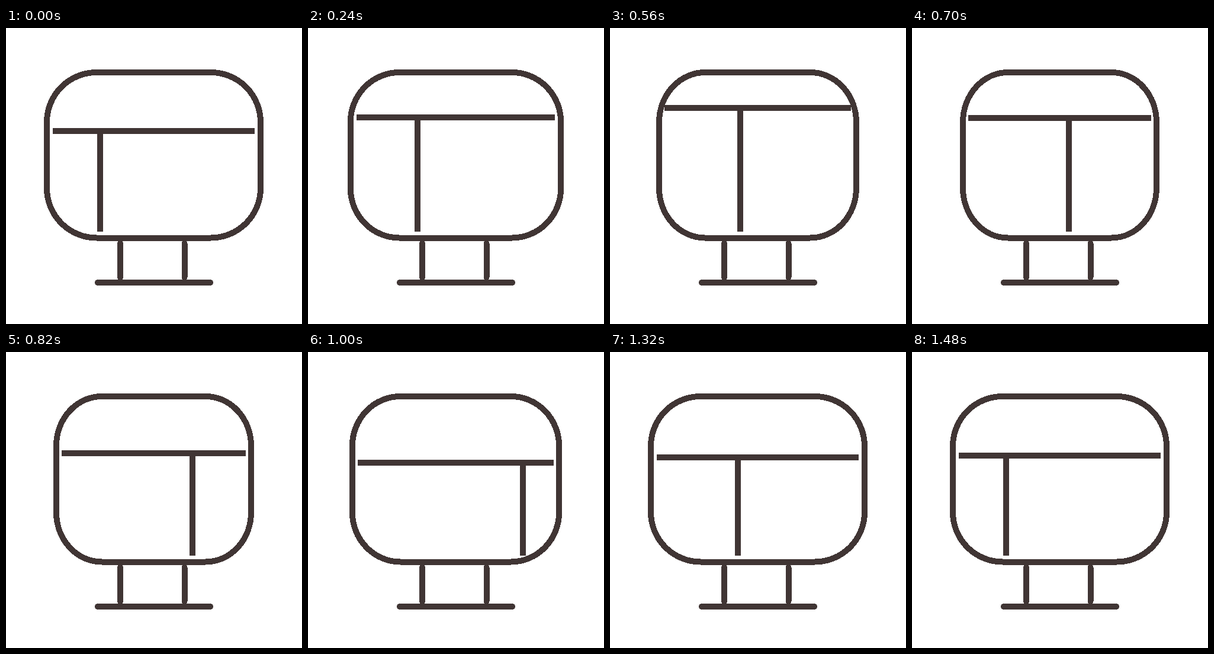
Recreate the animation shown at these times as an HTML page. Size 500 by 500 pixels, loop 1.5 s.

```html
<!DOCTYPE html>
<html lang="en">
<head>
<meta charset="utf-8">
<title>Screen on a stand</title>
<style>
  html, body { margin: 0; width: 100%; height: 100%; overflow: hidden; background: #fff; }
  svg { display: block; width: 100vw; height: 100vh; }
  g { fill: none; stroke: #403534; stroke-width: 10; shape-rendering: crispEdges; }
  .round { stroke-linecap: round; }
</style>
</head>
<body>
<svg viewBox="0 0 500 500">
  <g>
    <path class="round" d="M193 364V421M301.5 364V421M155 430H345"/>
    <rect id="screen" y="75" height="279.5"/>
    <path id="bars"/>
  </g>
</svg>
<script>
const LOOP = 1500, CX = 249.5;
const screenBox = document.getElementById('screen');
const bars = document.getElementById('bars');

const smooth = u => u * u * (3 - 2 * u);

// cubic-bezier(.3, 0, .55, 1), solved by bisection
function quick(u) {
  let lo = 0, hi = 1;
  for (let i = 0; i < 20; i++) {
    const m = (lo + hi) / 2, n = 1 - m;
    if (0.9 * n * n * m + 1.65 * n * m * m + m * m * m < u) lo = m; else hi = m;
  }
  return smooth(lo);
}

// Steps: [time, value, easing towards this step]
const squeeze = [[70, 1], [750, 0.904], [1160, 1]];
const dividerX = [[0, -90.5], [500, -38.5], [1000, 117.2], [1490, -90.5]];
const barY = [[0, 174.5], [500, 133, quick], [1000, 187], [1490, 174.5]];

function at(steps, t) {
  if (t <= steps[0][0]) return steps[0][1];
  for (let i = 1; i < steps.length; i++) {
    const [t0, v0] = steps[i - 1], [t1, v1, ease = smooth] = steps[i];
    if (t < t1) return v0 + (v1 - v0) * ease((t - t0) / (t1 - t0));
  }
  return steps[steps.length - 1][1];
}

function draw(t) {
  const s = at(squeeze, t), y = at(barY, t);
  const half = 180.5 * s, bar = 170.5 * s;
  const x = CX + at(dividerX, t) * s;
  screenBox.setAttribute('x', CX - half);
  screenBox.setAttribute('width', half * 2);
  screenBox.setAttribute('rx', 84 * s);
  screenBox.setAttribute('ry', 84);
  bars.setAttribute('d', `M${CX - bar} ${y}H${CX + bar}M${x} ${y}V344`);
}

const start = performance.now();
function tick() {
  draw((performance.now() - start) % LOOP);
  requestAnimationFrame(tick);
}
tick();
</script>
</body>
</html>
```
